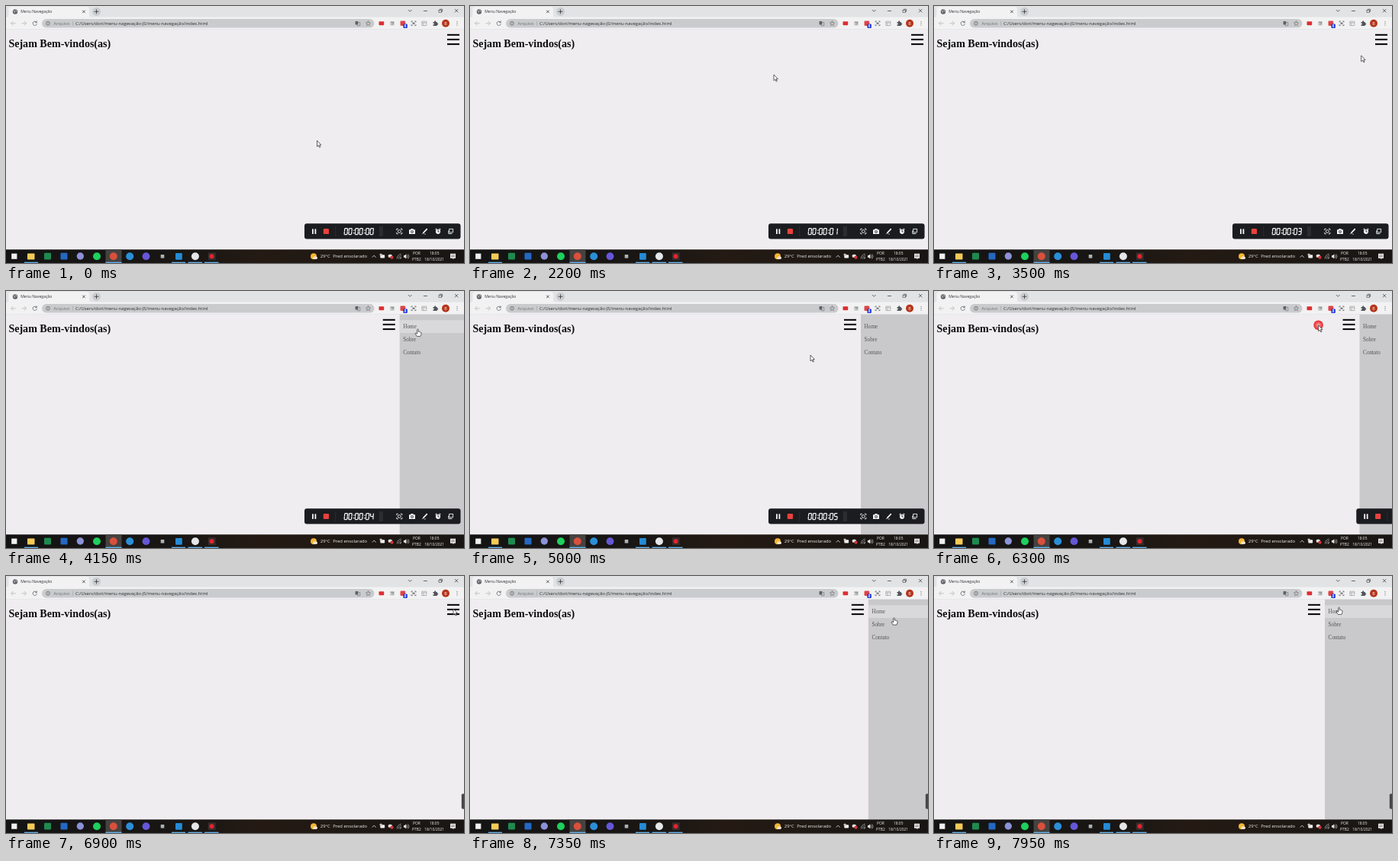
Recreate the animation shown at these times as an HTML page. Size 600x337 px, loop 8 s.

```html
<!DOCTYPE html>
<html lang="pt-BR">
<head>
<meta charset="utf-8">
<title>Menu Navegação</title>
<style>
html, body { margin: 0; width: 100%; height: 100%; overflow: hidden; background: #efedf0; }
svg { display: block; width: 100vw; height: 100vh; }
text { font-family: "Open Sans", "Noto Sans", sans-serif; white-space: pre; }
.serif { font-family: "Liberation Serif", "Times New Roman", serif; }
.line { fill: none; stroke-linecap: round; stroke-linejoin: round; }
</style>
</head>
<body>
<svg viewBox="0 0 600 337" preserveAspectRatio="none">
  <defs>
    <linearGradient id="bar">
      <stop offset="0" stop-color="#141414"/><stop offset=".4" stop-color="#191614"/>
      <stop offset=".55" stop-color="#241a13"/><stop offset="1" stop-color="#181614"/>
    </linearGradient>
  </defs>
  <rect width="600" height="337" fill="#efedf0"/>
  <text class="serif" x="3.4" y="53.5" font-size="14.05" font-weight="700" fill="#0b0b0c">Sejam Bem-vindos(as)</text>
  <g id="burger"></g>
  <g id="menu"></g>
  <g id="browser"></g>
  <g id="taskbar"></g>
  <g id="recorder"></g>
  <rect id="handle" x="596.8" y="285.5" width="5" height="20" rx="1.8" fill="#464649"/>
  <g id="ring">
    <circle r="6.3" fill="#e9353b"/><circle r="4.3" fill="#ef6266"/><circle r="2" fill="#f3a3a5"/>
  </g>
  <path id="arrow" d="M0 0V7.8L1.9 6.2L3.2 9L4.4 8.4L3.1 5.7H5.4Z" fill="#fff" stroke="#222" stroke-width=".7" stroke-linejoin="round"/>
  <path id="hand" d="M-.8 .8Q0-.4.8 .8V3.6Q1.8 3 2.2 3.9Q3.1 3.5 3.4 4.3Q4.3 4.1 4.4 5V7.2L3.4 9.6H-1.2L-3.4 6.2Q-3.5 5.1-2.4 5.3L-.8 6.4Z" fill="#fff" stroke="#222" stroke-width=".7" stroke-linejoin="round"/>
</svg>
<script>
const LOOP = 8000;
const $ = id => document.getElementById(id);
const rect = (x, y, w, h, fill, r = 0) => `<rect x="${x}" y="${y}" width="${w}" height="${h}" rx="${r}" fill="${fill}"/>`;
const disc = (x, y, r, fill) => `<circle cx="${x}" cy="${y}" r="${r}" fill="${fill}"/>`;
const circle = (x, y, r, stroke, w) => `<circle cx="${x}" cy="${y}" r="${r}" fill="none" stroke="${stroke}" stroke-width="${w}"/>`;
const shape = (d, fill) => `<path d="${d}" fill="${fill}"/>`;
const line = (d, stroke, w = .8) => `<path class="line" d="${d}" stroke="${stroke}" stroke-width="${w}"/>`;
const text = (x, y, size, fill, str, extra = '') => `<text x="${x}" y="${y}" font-size="${size}" fill="${fill}" ${extra}>${str}</text>`;
const mid = 'text-anchor="middle"';
const place = (el, x, y = 0) => el.setAttribute('transform', `translate(${x.toFixed(2)} ${y.toFixed(2)})`);
const show = (el, on) => el.setAttribute('visibility', on ? 'visible' : 'hidden');

function drawBrowser() {
  const ink = '#5f6368', pale = '#b5b6b8', dark = '#333', top = '#f2f2f3';
  $('browser').innerHTML = [
    rect(0, 0, 600, 15, '#e2e3e5'),
    shape('M0 15Q3.5 15 3.5 11.5V4.5Q3.5 1 7 1H105.500Q109 1 109 4.5V11.5Q109 15 112.5 15Z', top),
    rect(0, 14.5, 600, 15.8, top),
    rect(0, 30, 600, .5, '#dcdce0'),
    // tab
    disc(12, 7.5, 3.2, ink),
    line('M10 6.2L11.6 7L11 8.6M13 5L13.3 6.7L14.2 7.4', '#fff', .6),
    text(19.2, 9.4, 5.1, '#303236', 'Menu Navegação'),
    line('M100.400 5.9L103.4 8.9M103.4 5.9L100.400 8.9', dark),
    disc(118.5, 7.3, 5.6, '#cbcdd0'),
    line('M116 7.3H121M118.5 4.8V9.8', dark),
    // window controls
    line('M527.3 5.3L529.3 7.3L531.3 5.3M547.3 6.5H551.5M588.2 4.3L592 8.1M592 4.3L588.2 8.1', dark, .7),
    line('M567.3 5.3H570.5V8.3H567.3ZM568.4 5.2V4.2H571.6V7.2H570.7', dark, .6),
    // navigation
    line('M12.3 22.8H6.8M9.2 20.3L6.7 22.8L9.2 25.3', pale),
    line('M21 22.8H26.5M24.1 20.3L26.6 22.8L24.1 25.3', pale),
    line('M40 21.2A2.700 2.700 0 1 0 40.4 23.7M40.3 19.9V21.7H38.5', ink),
    rect(47, 17, 435.5, 11.6, '#cacbcc', 5.8),
    circle(55, 22.8, 2.5, ink, .7),
    line('M55 22.6V24M55 21.5V21.6', ink, .7),
    text(62.3, 25.1, 5.92, '#6d7175', 'Arquivo'),
    rect(87, 19.8, .5, 6, '#999b9d'),
    text(91, 25.1, 5.92, '#2c2e31', 'C:/Users/dori/menu-nagevação-JS/menu-navegação/index.html'),
    // address bar tools
    rect(457.6, 20, 3.7, 4.4, '#5d6165', .5),
    line('M461.8 21.5H463.8V25.8H460.3V24.8', '#75797d', .7),
    line('M474.5 19.7L475.4 21.8L477.6 22L475.9 23.5L476.4 25.7L474.5 24.5L472.6 25.7L473.1 23.5L471.4 22L473.6 21.8Z', ink, .6),
    // extensions
    rect(488.5, 20.3, 6.7, 5, '#dc2f32', 1),
    rect(503.3, 20, 5.5, 5.5, '#c3c4c6', .5),
    line('M504.6 21.4H507.4V23L506 24.2', '#67696c', .6),
    rect(516.5, 19.5, 6.7, 6.4, '#df4548', 1.2),
    rect(520.4, 23.6, 5.4, 5.4, '#1c33d6', 1),
    text(523.1, 28, 4.4, '#fff', '0', mid + ' font-weight="700"'),
    line('M531 21V20H532.3M535.7 20H537V21M537 24.6V25.6H535.7M532.3 25.6H531V24.6', '#55585c'),
    rect(532.4, 21.5, 3.2, 2.6, '#85888b'),
    line('M545.2 20.2H550.8V25.6H545.2ZM545.2 22H550.8M547 22V25.6', '#9c9da0', .7),
    shape('M559.5 21H561.1Q561.1 19.3 562.2 19.3Q563.3 19.3 563.3 21H564.8V22.5Q566.3 22.5 566.3 23.6Q566.3 24.7 564.8 24.7V26H559.5V24.5Q561 24.3 561 23.4Q561 22.6 559.5 22.5Z', '#505357'),
    disc(576, 22.8, 5, '#b5341a'),
    text(576, 24.7, 5.2, '#fff', 'B', mid),
    [20.6, 22.8, 25].map(y => disc(591, y, .6, ink)).join('')
  ].join('');
}

function drawTaskbar() {
  const white = '#f1f0ef', blue = '#62b2ee';
  const running = [[24, 18], [130.5, 21], [217, 18], [238.5, 18.5], [260, 18.5]];
  $('taskbar').innerHTML = [
    rect(0, 319.3, 600, 17.7, 'url(#bar)'),
    rect(130.5, 319.3, 21, 17.7, '#454240'),
    running.map(([x, w]) => rect(x, 335.7, w, 1.3, blue)).join(''),
    // launchers
    rect(7.2, 324.6, 7.2, 7.2, white),
    rect(28, 324.4, 9.5, 8, '#f5ca56', .6),
    rect(50, 323.8, 9, 8.8, '#1f8a50', 1),
    rect(71.5, 323.8, 9, 8.8, '#2468c4', 1),
    disc(97.3, 328, 4.7, '#8d91d6'),
    disc(119, 328.2, 5, '#1ed05c'),
    disc(140.8, 328.2, 5, '#d9503c'),
    disc(162.2, 328.2, 5, '#2a8fd8'),
    disc(183.5, 328.2, 4.9, '#6657d8'),
    rect(202.7, 326, 4.6, 4.6, '#aeb0b2'),
    rect(222, 323.9, 8.8, 8.8, '#268bd5', 1),
    disc(247.9, 328.2, 5, '#e5e6e8'),
    rect(264.8, 323.3, 10, 10, '#342d2d', 1),
    disc(269.5, 328.2, 3, '#e2252d'),
    // weather
    disc(403, 328.2, 4, '#f6b632'),
    rect(402.3, 328.5, 5.7, 3.4, '#eee5d3', 1.7),
    text(411.8, 330.3, 5.85, white, '29°C'),
    text(428.3, 330.3, 5.85, white, 'Pred ensolarado'),
    // tray
    line('M480 329.3L482.2 327.1L484.4 329.3', white),
    rect(490.3, 326.2, 5.8, 4.2, white, .7),
    rect(489.7, 324.7, 2.8, 2.8, '#c5c5c3', .5),
    rect(500.6, 325.8, 5.4, 4, '#e3e1df', 1.9),
    disc(505.5, 329.7, 2.1, '#d8343a'),
    line('M512.3 331A5.5 5.5 0 0 1 517.5 325.3M514.3 331A3.2 3.2 0 0 1 517.5 327.5', '#aaa7a4'),
    line('M516.4 331A1.3 1.3 0 0 1 517.6 329.7', white, .9),
    shape('M521 327H522.4L524.3 325.2V331.6L522.4 329.8H521Z', white),
    line('M525.5 327A2 2 0 0 1 525.5 329.8M526.9 325.7A4 4 0 0 1 526.9 331.1', white, .6),
    text(537.9, 325.8, 4.9, white, 'POR', mid),
    text(537.9, 333.5, 4.9, white, 'PTB2', mid),
    text(561.2, 325.8, 4.9, white, '18:05', mid),
    text(561.2, 333.5, 4.9, white, '18/10/2021', mid),
    shape('M582 324.7H589V330.8H587L585.5 332.4V330.8H582Z', white),
    line('M583.3 326.8H587.7M583.3 328.6H587.7', '#403a36', .6)
  ].join('');
}

// Seven segments a to g of one digit
const SEGS = ['M.6 0H3.2', 'M3.8 .6V3.4', 'M3.8 4.6V7.4', 'M.6 8H3.2', 'M0 4.6V7.4', 'M0 .6V3.4', 'M.6 4H3.2'];
const LIT = ['abcdef', 'bc', 'abged', 'abgcd', 'fgbc', 'afgcd', 'afgedc'];
const digit = n => [...LIT[n]].map(c => line(SEGS[c.charCodeAt(0) - 97], '#f4f4f5', 1.25)).join('');

function drawRecorder() {
  const white = '#f3f3f4', body = '#1b1c1f';
  const zeros = [443.8, 449.5, 457.9, 463.6, 472];
  const slant = (x, content, id = '') => `<g ${id} transform="translate(${x} 291.5) skewX(-5)">${content}</g>`;
  const colon = x => rect(x, 293.4, 1.2, 1.4, white) + rect(x - .2, 297, 1.2, 1.4, white);
  $('recorder').innerHTML = [
    rect(391, 285.3, 204.5, 20.3, body, 3),
    rect(401, 292.2, 1.8, 6.7, white, .5),
    rect(404.5, 292.2, 1.8, 6.7, white, .5),
    rect(415.8, 291.9, 7.2, 7.2, '#e8413f', 1.2),
    rect(431.5, 289, .6, 13, '#34363a'),
    zeros.map(x => slant(x, digit(0))).join(''),
    colon(455.2), colon(469.3),
    slant(477.7, '', 'id="ones"'),
    rect(488.8, 289, 5.2, 13, '#2b2c30', .6),
    // tools
    line('M511.8 293.8V292.2H513.4M517.2 292.2H518.8V293.8M518.8 297.2V298.8H517.2M513.4 298.8H511.8V297.2', white, .9),
    circle(515.3, 295.5, 1.9, white, .9),
    shape('M528 293.3H530L530.7 292H533.3L534 293.3H536V299H528Z', white),
    disc(532, 296, 1.8, body), disc(532, 296, .9, white),
    line('M546.7 297.5L551.3 292.6', white, 1.7),
    line('M545.4 299L546.7 297.5M548 299H549.5', white, .7),
    disc(566, 295.8, 3.1, white),
    line('M563 293L564 292.2M568 292.2L569 293', white, 1.1),
    line('M566 294V296H567.4', body),
    line('M581 292.4H585.6V296.8H581Z', white, .9),
    line('M579.8 295V298.6H584', white, .9)
  ].join('');
}

const ITEMS = ['Home', 'Sobre', 'Contato'];
const ROW_TOP = 38.2, ROW = 16.8;

function drawMenu() {
  $('burger').innerHTML = [36.8, 42.9, 49].map(y => rect(-22, y, 16, 2.1, '#0c0c0d')).join('');
  $('menu').innerHTML = rect(0, 30.4, 100, 289, '#c9c8ca')
    + `<rect id="hover" width="100" height="${ROW}" fill="#d9d8da"/>`
    + ITEMS.map((s, i) => text(4.6, 49 + i * ROW, 7.2, '#565558', s, 'class="serif"')).join('');
}

// CSS "ease" timing curve
function ease(p) {
  if (p <= 0) return 0;
  if (p >= 1) return 1;
  let lo = 0, hi = 1;
  for (let i = 0; i < 24; i++) {
    const s = (lo + hi) / 2;
    const x = .75 * s * (1 - s) + s ** 3;
    if (x < p) lo = s; else hi = s;
  }
  const q = 1 - lo;
  return .3 * q * q * lo + 3 * q * lo * lo + lo ** 3;
}

const SLIDE = 500;
const toggled = (t, start) => ease((t - start) / SLIDE);
const menuX = t => 600 - 88 * (toggled(t, 3780) - toggled(t, 6150) + toggled(t, 7049));

// time, x, y of the pointer tip
const PATH = [
  [2000, 407.5, 176.5], [2200, 398, 90], [2480, 156, 112], [2800, 432, 150], [3150, 470, 120],
  [3650, 584, 50], [3780, 586, 44], [3950, 566, 46], [4150, 539.5, 49.8], [4500, 532, 52],
  [4700, 528, 76], [5000, 446, 84], [5350, 490, 66], [5750, 516, 44.8], [6000, 505, 45],
  [6350, 503.5, 44.8], [6900, 586, 43], [7080, 586, 43], [7350, 555.5, 54.5], [7700, 540, 48], [7950, 530.5, 40.8]
];

function pointer(t) {
  const next = PATH.findIndex(k => k[0] > t);
  if (next === 0) return PATH[0].slice(1);
  if (next < 0) return PATH[PATH.length - 1].slice(1);
  const [a, b] = [PATH[next - 1], PATH[next]];
  const p = (t - a[0]) / (b[0] - a[0]), s = p * p * (3 - 2 * p);
  return [a[1] + (b[1] - a[1]) * s, a[2] + (b[2] - a[2]) * s];
}

const CLICKS = [[3730, 586, 44], [6100, 503.6, 44.8], [6990, 586, 43]];
const DOCKED = 206;
let shownSecond = -1;

function render(t) {
  const mx = menuX(t), [x, y] = pointer(t);
  place($('menu'), mx);
  place($('burger'), mx);

  const row = Math.floor((y - ROW_TOP) / ROW);
  const over = x >= mx && row >= 0 && row < ITEMS.length;
  show($('hover'), over);
  if (over) $('hover').setAttribute('y', ROW_TOP + row * ROW);
  show($('hand'), over);
  show($('arrow'), !over);
  place($(over ? 'hand' : 'arrow'), x, y);

  const click = CLICKS.find(c => t >= c[0] && t < c[0] + 280);
  show($('ring'), !!click);
  if (click) place($('ring'), click[1], click[2]);

  // the recorder slides off and leaves a small handle at the edge
  const slide = Math.min(DOCKED, Math.max(0, (t - 5706) * .2727));
  place($('recorder'), slide);
  show($('recorder'), slide < DOCKED);
  show($('handle'), slide === DOCKED);
  const second = Math.max(0, Math.min(6, Math.floor((t - 1650) / 830) + 1));
  if (second !== shownSecond) {
    $('ones').innerHTML = digit(second);
    shownSecond = second;
  }
}

drawBrowser();
drawTaskbar();
drawRecorder();
drawMenu();
const start = performance.now();
function tick() {
  render((performance.now() - start) % LOOP);
  requestAnimationFrame(tick);
}
tick();
</script>
</body>
</html>
```
